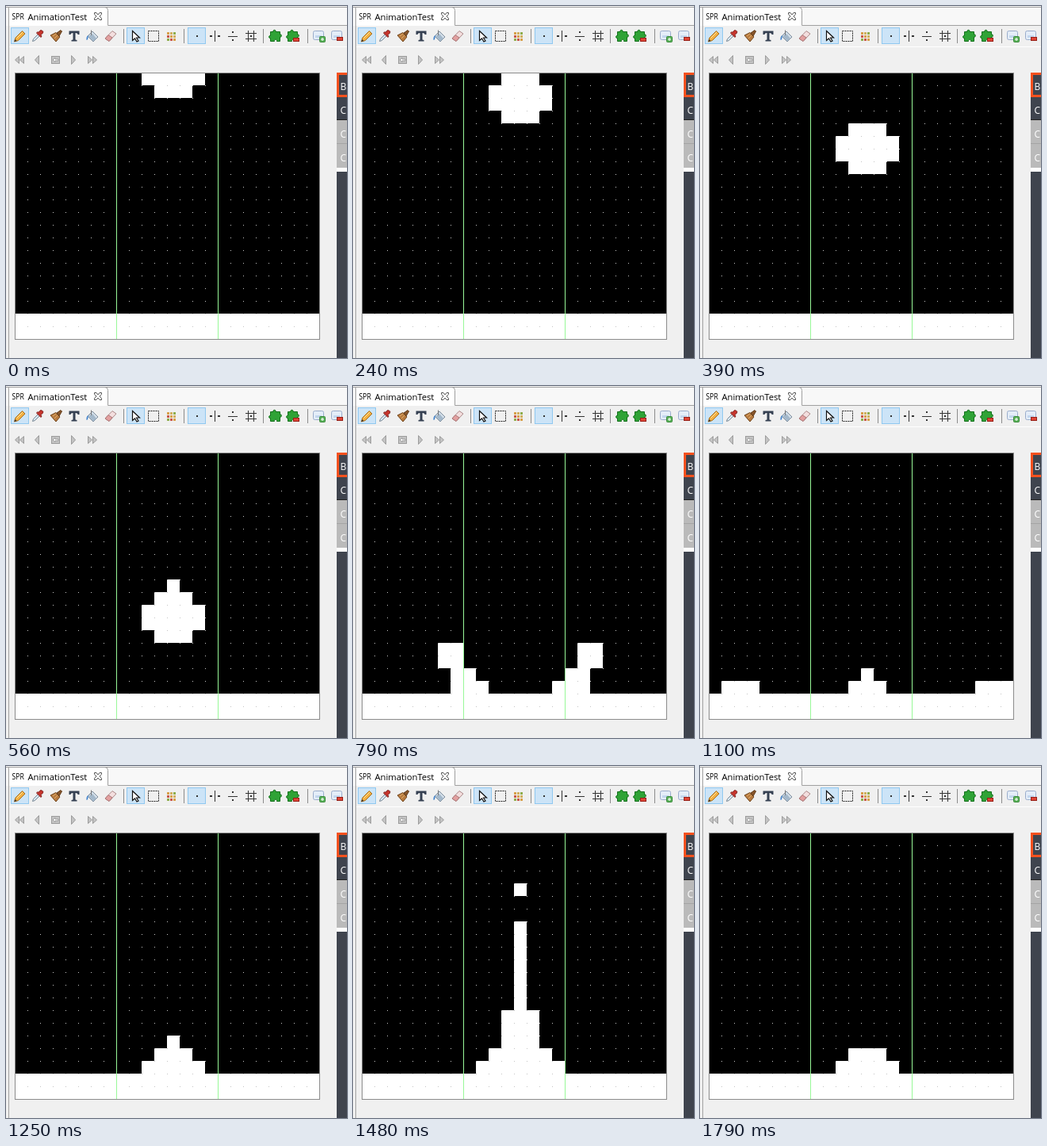
These frames come from a looping animation (430x444 px, 1.85 s). An HTML page:

```html
<!DOCTYPE html>
<html lang="en">
<head>
<meta charset="utf-8">
<title>Sprite editor</title>
<style>
  html, body { margin: 0; width: 100%; height: 100%; overflow: hidden; background: #f0f0f0; }
  svg { display: block; }
  text { font-family: "Open Sans", "Noto Sans", sans-serif; }
  .on { fill: #cce4f7; stroke: #90c8f0; }
  .sep { stroke: #8c8c8c; }
  .nav { fill: #c4c4c4; stroke: #9c9c9c; }
</style>
</head>
<body>
<svg width="430" height="444" viewBox="0 0 430 444">
  <defs>
    <pattern id="dots" x="11" y="84" width="16" height="16" patternUnits="userSpaceOnUse">
      <rect width="1" height="1" fill="#c4c4c4"/>
    </pattern>
    <path id="puzzle" d="M-6.500-5.500h3.500c-1-3 4-3 3 0h5.500v3.500c2.500-1 2.500 4 0 3v5.500h-4c1-3-4-3-3 0h-5v-4c-2.500 1-2.500-4 0-3z" fill="#2fa336" stroke="#14701c"/>
    <g id="card">
      <rect x="-7.500" y="-6.500" width="13" height="11" rx="2" fill="#e4edf8" stroke="#9aaccb"/>
      <path d="M-5 2h8V-1h-8z" fill="#c3d6ee"/>
    </g>
  </defs>

  <!-- tab strip -->
  <rect width="430" height="25" fill="#f8f8f8"/>
  <path d="M3.500 444V1.500H124q4.500 0 4.500 5V25" fill="#fff"/>
  <rect x="4" y="25" width="426" height="419" fill="#f0f0f0"/>
  <path d="M3.500 444V1.500M124.500 1.500q4 0 4 4V24.500H430M0 1.500H430" fill="none" stroke="#a0a0a0"/>
  <path d="M4 51.500H430" stroke="#fff"/>
  <text transform="translate(7.500 17) scale(.82 1)" font-size="10.500">SPR</text>
  <text x="27.500" y="18" font-size="11.200" font-weight="500">AnimationTest</text>
  <path d="M111.500 8.500h2.500l2 2.500 2-2.500h2.500v2l-2.500 2.500 2.500 2.500v2h-2.500l-2-2.500-2 2.500h-2.500v-2l2.500-2.500-2.500-2.500z" fill="#fff" stroke="#555"/>

  <!-- tool bar -->
  <g class="on">
    <rect x="6.500" y="27.500" width="22" height="20"/>
    <rect x="152.500" y="27.500" width="22" height="20"/>
    <rect x="229.500" y="27.500" width="22" height="20"/>
  </g>
  <path class="sep" d="M148.500 29v18M224.500 29v18M324.500 29v18M380.500 29v18"/>

  <g transform="translate(17.500 38)">
    <path d="M-7 7l1.500-5L3-6.500 6.500-3-2 5.500z" fill="#f2b143" stroke="#a86a18"/>
    <path d="M-7 7l1-3 2 2z" fill="#333"/>
    <path d="M-4 2.500L3.500-5" stroke="#ffe09a"/>
  </g>
  <g transform="translate(40 38)">
    <path d="M-6.500 6.500l1-3L1-3 3-1-3.500 5.500z" fill="#d5e6f2" stroke="#7c8995"/>
    <path d="M-1.500-4l5.500 5.500 1-1.500-1-1.500 2.500-2.500q1-2-1-3t-3 .500L1-4.500l-1-1z" fill="#c8342c" stroke="#7e2420"/>
  </g>
  <g transform="translate(63 38)">
    <path d="M-7-1L0-4.500 5 1 0 7z" fill="#b87a3e" stroke="#70461e"/>
    <path d="M-4 0l4-3M-2 3l4-4" stroke="#e0b070"/>
    <path d="M1-4l5-3.500L7.500-6 4 0z" fill="#88552a" stroke="#603a1a"/>
  </g>
  <path transform="translate(86 38)" d="M-6.500-6.500h13v4.500H4.500q0-2-3-2V4.500l2 .500V6.500h-7V5l2-.500V-4q-3 0-3 2h-2z" fill="#354052"/>
  <g transform="translate(109 38)">
    <path d="M-6 0L0-6 7 1 1 7z" fill="#d4dfe9" stroke="#7e8d9c"/>
    <path d="M-5 0L0-3 5 3 1 6.500z" fill="#a4b8ca"/>
    <path d="M-1.500-1V-7.500" stroke="#777"/>
    <path d="M-5-1q-3 1-2.500 6 2 0 2-4z" fill="#3f82cd"/>
  </g>
  <g transform="translate(132 38)">
    <path d="M-7 3L2-6.500 7-3-2 6.500z" fill="#f3dede" stroke="#ac8989"/>
    <path d="M-7 3l4-4.500 5 3.500-4 4.500z" fill="#e2a0a0" stroke="#ac7777"/>
  </g>

  <path d="M159.500 31.500v12l3-2.500 2.500 4 2-1-2.500-4h4z" fill="#fff" stroke="#111" stroke-width="1.200"/>
  <rect x="179.500" y="31.500" width="13" height="13" fill="none" stroke="#222" stroke-dasharray="2 1"/>
  <g id="swatches"></g>

  <!-- symmetry modes -->
  <g fill="none" stroke="#333" shape-rendering="crispEdges">
    <path d="M240 38h2M257 38h3M267 38h3M285 33h2M285 43h2M308 38h2" stroke-width="2"/>
    <path d="M263.500 31v14M280 38.500h12M305.500 31v14M312.500 31v14M302 34.500h14M302 41.500h14"/>
  </g>

  <use href="#puzzle" x="340" y="38"/>
  <use href="#puzzle" x="362" y="38"/>
  <rect x="362.500" y="40.500" width="7" height="4" fill="#e04436" stroke="#962018"/>
  <use href="#card" x="395" y="38"/>
  <rect x="395.500" y="38.500" width="7" height="7" rx="1" fill="#58b058" stroke="#3c8a3c"/>
  <path d="M399 40v4M397 42h4" stroke="#fff"/>
  <use href="#card" x="418" y="38"/>
  <rect x="417.500" y="39.500" width="7" height="4" fill="#e04436" stroke="#962018"/>

  <!-- playback bar -->
  <g class="nav">
    <path d="M16.500 63.500v9l-5-4.500zM22.500 63.500v9l-5-4.500zM41.500 62.500v11l-5-5.500z"/>
    <rect x="57.500" y="63.500" width="10" height="9"/>
    <path d="M59 68l3-2.500v1.500h4v2h-4v1.500z" fill="#fff"/>
    <path d="M82.500 62.500v11l5-5.500zM103.500 63.500v9l5-4.500zM109.500 63.500v9l5-4.500z"/>
  </g>

  <!-- side list -->
  <g font-size="12" fill="#fff">
    <rect x="417" y="84" width="13" height="60" fill="#3f444e"/>
    <path d="M430 85.500H418.500V113.500H430" fill="none" stroke="#f4511e" stroke-width="3"/>
    <rect x="417" y="143" width="13" height="1" fill="#222"/>
    <rect x="417" y="144" width="13" height="60" fill="#bababa"/>
    <rect x="417" y="173" width="13" height="1" fill="#a4a4a4"/>
    <rect x="417" y="204" width="13" height="5" fill="#fff"/>
    <rect x="417" y="209" width="13" height="235" fill="#3f444e"/>
    <text x="421.500" y="106">B</text>
    <text x="421.500" y="136">C</text>
    <text x="421.500" y="166">C</text>
    <text x="421.500" y="196">C</text>
  </g>

  <!-- sprite canvas -->
  <g shape-rendering="crispEdges">
    <rect x="11" y="84" width="385" height="304"/>
    <rect x="11" y="388" width="385" height="33" fill="#fff"/>
    <path id="water" fill="#fff"/>
    <rect x="12" y="85" width="383" height="335" fill="url(#dots)"/>
    <path d="M139.500 85V420M267.500 85V420" stroke="#98f898"/>
    <rect x="11.500" y="84.500" width="384" height="336" fill="none" stroke="#8c8c8c"/>
  </g>
</svg>
<script>
const CELL = 16, LEFT = 11, TOP = 84, MID = 12, LOOP = 1850;

// Block of rows, mirrored about the middle column, from inner to outer distance.
function block(row, height, outer, inner = 0) {
  const y = TOP + row * CELL, h = height * CELL;
  const rect = (col, cols) => `M${LEFT + col * CELL} ${y}h${cols * CELL}v${h}h${-cols * CELL}z`;
  if (!inner) return rect(MID - outer, outer * 2 + 1);
  const cols = outer - inner + 1;
  return rect(MID - outer, cols) + rect(MID + inner, cols);
}
// Rows of the given half widths, downwards from a top row; negative rows are hidden.
const stack = (top, ...halves) =>
  halves.map((half, i) => top + i < 0 ? "" : block(top + i, 1, half)).join("");
const drop = top => stack(top, 1, 2, 2, 1);
const tailed = top => block(top - 1, 1, 0) + drop(top);
// Splash arms: one [inner, outer] distance pair per row.
const arms = (top, ...spans) =>
  spans.map(([a, b], i) => block(top + i, 1, b, a)).join("");
const jet = (tip, neck, ...base) => block(tip, neck - tip, 0) + stack(neck, ...base);

const steps = [
  [0, drop(-2)],
  [150, drop(-1)],
  [240, drop(0)],
  [390, drop(4)],
  [470, tailed(7)],
  [560, tailed(11)],
  [710, stack(15, 0, 1, 2, 2)],
  [790, arms(15, [5, 6], [5, 6], [4, 5], [3, 5])],
  [960, arms(16, [7, 8], [6, 8], [5, 7]) + stack(17, 0, 1)],
  [1020, arms(17, [8, 10], [8, 9]) + stack(17, 0, 1)],
  [1100, arms(18, [9, 11]) + stack(17, 0, 1)],
  [1250, stack(16, 0, 1, 2)],
  [1330, jet(12, 16, 1, 1, 2)],
  [1480, block(4, 1, 0) + jet(7, 14, 1, 1, 1, 2, 3)],
  [1560, jet(8, 14, 1, 1, 1, 2, 3)],
  [1620, jet(13, 15, 1, 1, 2, 3)],
  [1790, stack(17, 1, 2)]
];

const hues = ["#d8a04a", "#c8584a", "#8fae4c", "#d0b060"];
let swatches = "";
for (let i = 0; i < 9; i++) {
  const x = 203 + i % 3 * 4, y = 33 + Math.floor(i / 3) * 4;
  swatches += `<rect x="${x}" y="${y}" width="3" height="3" fill="${hues[i * 3 % 4]}"/>`;
}
document.getElementById("swatches").innerHTML = swatches;

const water = document.getElementById("water");
const start = performance.now();
let shown = null;
function draw() {
  const t = (performance.now() - start) % LOOP;
  const step = steps.findLast(([at]) => at <= t);
  if (step !== shown) {
    water.setAttribute("d", step[1]);
    shown = step;
  }
  requestAnimationFrame(draw);
}
draw();
</script>
</body>
</html>
```
